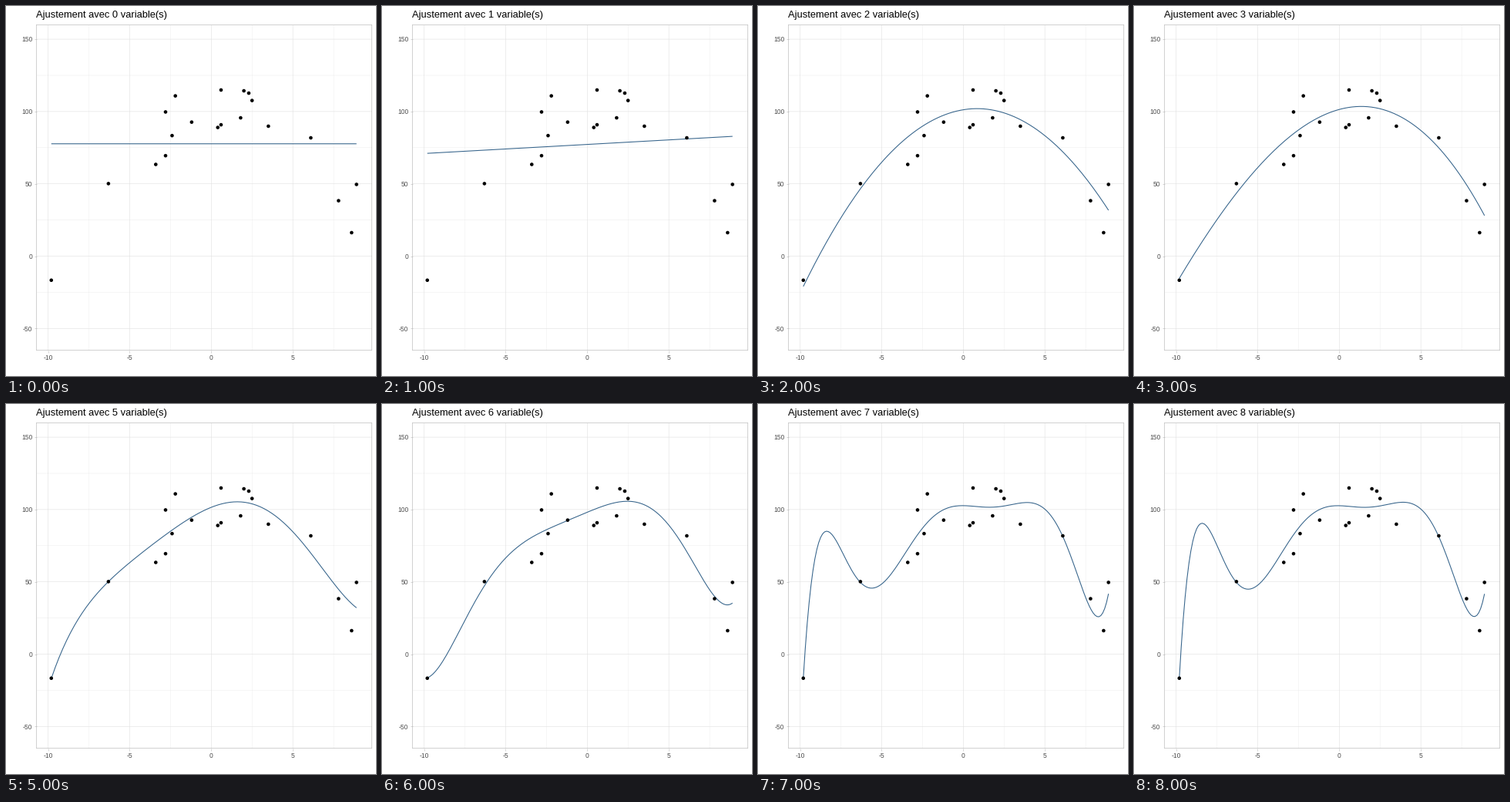
Animation, 480 px wide and 480 px high, one loop 9 s. Source, as a matplotlib script:

```python
import math
import random

import matplotlib.pyplot as plt
import numpy as np
from matplotlib.animation import FuncAnimation
from numpy.polynomial import Polynomial

SIZE, DPI = 480, 72  # one point equals one pixel
LEFT, RIGHT, TOP, BOTTOM = 39.5, 474.5, 24.5, 446.5
POINTS, DEGREES, SEED = 20, 9, 123
LINE_COLOR, BORDER, GRID, LABEL = "#36648B", "#B3B3B3", "#DEDEDE", "#4D4D4D"

plt.rcParams["font.family"] = "Liberation Sans"
plt.rcParams["path.snap"] = False


def r_generator(seed):
    """Mersenne Twister seeded the way R's set.seed() does it."""
    state = []
    for _ in range(50 + 1 + 624):
        seed = (69069 * seed + 1) % 2**32
        state.append(seed)
    rng = random.Random(seed)
    rng.setstate((3, tuple(state[-624:]) + (624,), None))
    return rng


def normal_quantile(p):
    z = 0.0
    for _ in range(30):  # Newton's method
        cdf = 0.5 * (1 + math.erf(z / math.sqrt(2)))
        z -= (cdf - p) * math.sqrt(2 * math.pi) * math.exp(z * z / 2)
    return z


def rnorm(rng, n):
    """Normal deviates by inversion of two joined uniforms, as in R."""
    def uniform():
        return rng.getrandbits(32) / 2**32

    big = 2**27
    return np.array([normal_quantile((int(big * uniform()) + uniform()) / big)
                     for _ in range(n)])


rng = r_generator(SEED)
x = np.round(5 * rnorm(rng, POINTS), 1)
y = 100 + 2 * x - x**2 + 16 * rnorm(rng, POINTS)
grid_x = np.linspace(x.min(), x.max(), 160)

fig = plt.figure(figsize=(SIZE / DPI, SIZE / DPI), dpi=DPI, facecolor="white")
ax = fig.add_axes([LEFT / SIZE, 1 - BOTTOM / SIZE,
                   (RIGHT - LEFT) / SIZE, (BOTTOM - TOP) / SIZE])
ax.set_xlim(-10.71, 9.835)
ax.set_ylim(-65, 159.9)


def px_text(px, py, text, size, color, ha):
    """Place text by its baseline, in pixels from the top left corner."""
    return fig.text(px / SIZE, 1 - py / SIZE, text, fontsize=size,
                    color=color, ha=ha, va="baseline")


def to_px(vx, vy):
    px, py = ax.transData.transform((vx, vy))
    return px, SIZE - py


def style_axes():
    ax.set_axisbelow(True)
    ax.set_xticks(np.arange(-10, 6, 5))
    ax.set_xticks(np.arange(-7.5, 8, 5), minor=True)
    ax.set_yticks(np.arange(-50, 151, 50))
    ax.set_yticks(np.arange(-25, 126, 50), minor=True)
    ax.grid(which="major", color=GRID, lw=0.53)
    ax.grid(which="minor", color=GRID, lw=0.27)
    ax.tick_params(which="major", length=2.75, width=0.53, color=BORDER,
                   labelleft=False, labelbottom=False)
    ax.tick_params(which="minor", length=0)
    for spine in ax.spines.values():
        spine.set(color=BORDER, linewidth=0.6)
    for v in ax.get_xticks():
        px_text(to_px(v, 0)[0], 459, f"{v:.0f}", 8.5, LABEL, "center")
    for v in ax.get_yticks():
        px_text(34.5, to_px(0, v)[1] + 3.3, f"{v:.0f}", 8.5, LABEL, "right")


style_axes()
curve, = ax.plot([], [], color=LINE_COLOR, lw=1.07, solid_capstyle="butt", zorder=3)
# One size per dot keeps subpixel positions
ax.scatter(x, y, s=np.full(POINTS, 4.6**2), color="black", linewidths=0, zorder=4)
title = px_text(39, 15, "", 12.9, "black", "left")


def update(degree):
    fit = Polynomial.fit(x, y, degree)
    curve.set_data(grid_x, fit(grid_x))
    title.set_text(f"Ajustement avec {degree} variable(s)")
    return curve, title


anim = FuncAnimation(fig, update, frames=DEGREES, interval=1000,
                     repeat=True, repeat_delay=0)
plt.show()
```
